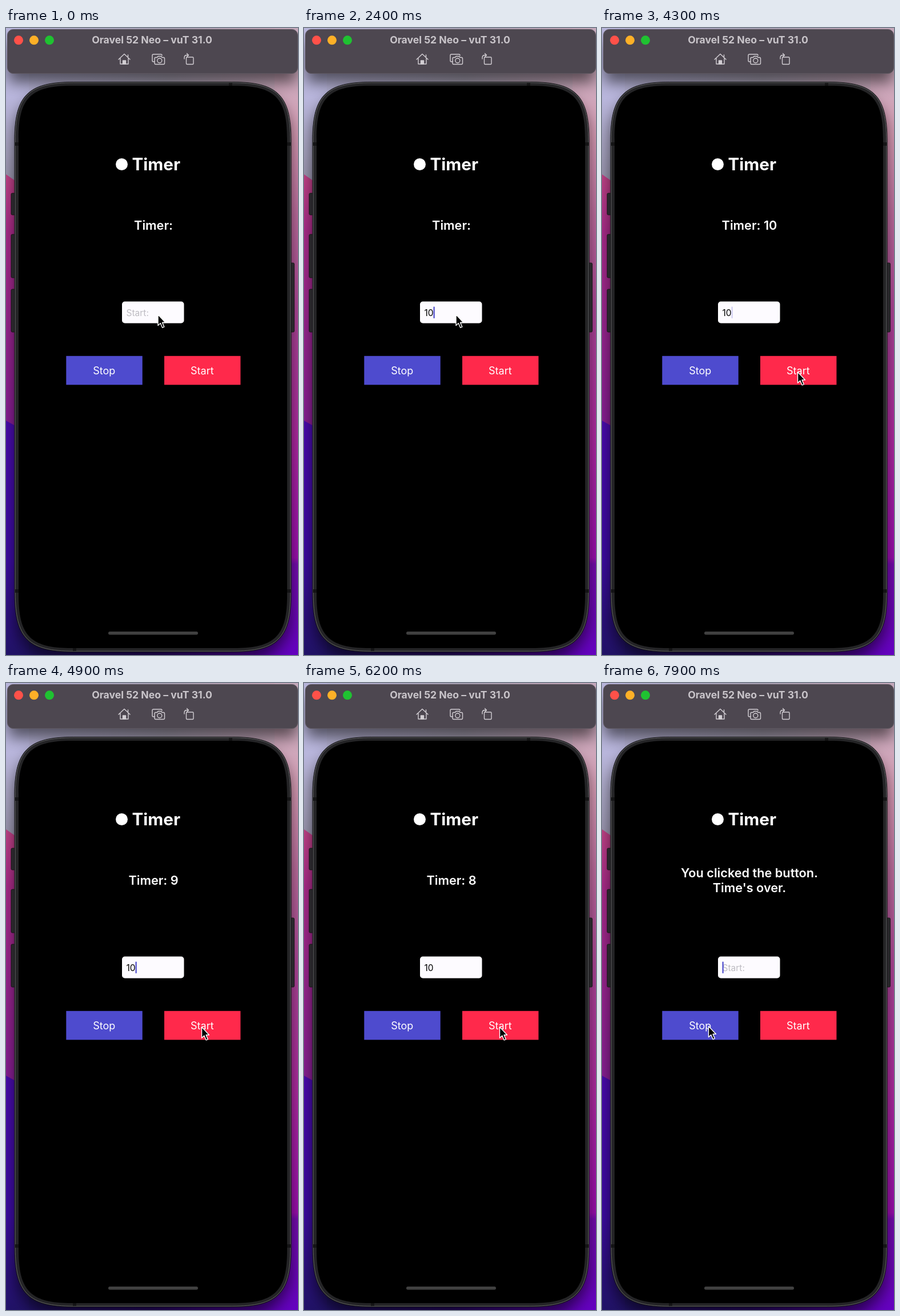
An HTML page for the animation above (8000 ms loop, 511 by 1097 pixels).

```html
<!DOCTYPE html>
<html lang="en">
<head>
<meta charset="utf-8">
<title>Timer</title>
<style>
  html, body { margin: 0; width: 100%; height: 100%; overflow: hidden; background: #17131f; }
  svg { display: block; width: 100vw; height: 100vh; }
  text { font-family: Inter, "Liberation Sans", sans-serif; fill: #fff; }
  .mid { text-anchor: middle; }
  .bar { font-size: 17.6px; font-weight: 700; fill: #c9c5ca; }
  .title { font-size: 29.6px; font-weight: 650; }
  .label { font-size: 21.7px; font-weight: 620; }
  .button { font-size: 18px; }
  .entry { font-size: 15.5px; }
  .icons { fill: none; stroke: #d2ced3; stroke-width: 1.4; stroke-linejoin: round; stroke-linecap: round; }
</style>
</head>
<body>
<svg viewBox="0 0 511 1097" preserveAspectRatio="none">
  <defs>
    <linearGradient id="sky" x2="0" y2="1">
      <stop offset="0" stop-color="#b9b6dc"/>
      <stop offset=".11" stop-color="#b9b6dc"/>
      <stop offset=".18" stop-color="#aaa6c4"/>
      <stop offset=".25" stop-color="#9793ab"/>
    </linearGradient>
    <linearGradient id="magenta" x2="0" y2="1">
      <stop offset="0" stop-color="#c24488"/>
      <stop offset=".2" stop-color="#aa2b8a"/>
      <stop offset="1" stop-color="#801c95"/>
    </linearGradient>
    <linearGradient id="indigo" x2="0" y2="1">
      <stop offset="0" stop-color="#4a0cae"/>
      <stop offset=".6" stop-color="#3c0ca2"/>
      <stop offset="1" stop-color="#211366"/>
    </linearGradient>
    <linearGradient id="rose" x2="0" y2="1">
      <stop offset="0" stop-color="#c6aabd"/>
      <stop offset=".11" stop-color="#cfa7bb"/>
      <stop offset=".17" stop-color="#d79bb4"/>
      <stop offset=".3" stop-color="#bf6d9f"/>
      <stop offset=".45" stop-color="#ae4798"/>
      <stop offset=".65" stop-color="#b02ba2"/>
      <stop offset=".845" stop-color="#9c0fb0"/>
      <stop offset=".855" stop-color="#760cb0"/>
      <stop offset="1" stop-color="#6402c0"/>
    </linearGradient>
    <linearGradient id="top">
      <stop offset="0" stop-color="#b9b6dc"/>
      <stop offset=".55" stop-color="#aaa3b5"/>
      <stop offset="1" stop-color="#cba8bb"/>
    </linearGradient>
    <linearGradient id="floor">
      <stop offset="0" stop-color="#211366"/>
      <stop offset=".5" stop-color="#2b0a70"/>
      <stop offset="1" stop-color="#6402c0"/>
    </linearGradient>
    <filter id="soft" x="-20%" y="-80%" width="140%" height="260%"><feGaussianBlur stdDeviation="13"/></filter>
  </defs>

  <rect width="511" height="1097" fill="url(#top)"/>
  <path d="M0 0H40V1097H0Z" fill="url(#sky)"/>
  <path d="M0 256L40 284V760H0Z" fill="url(#magenta)"/>
  <path d="M0 687L40 709V1097H0Z" fill="url(#indigo)"/>
  <path d="M470 0H511V1097H470Z" fill="url(#rose)"/>
  <path d="M40 1030H470V1097H40Z" fill="url(#floor)"/>
  <rect x="4" y="22" width="505" height="74" rx="10" opacity=".55" filter="url(#soft)"/>
  <rect x="15" y="112" width="484" height="996" rx="76" opacity=".55" filter="url(#soft)"/>

  <rect x="2.500" y="2.500" width="508" height="77" rx="10" fill="#4d4750" stroke="#5d5760"/>
  <circle cx="22" cy="21.300" r="8" fill="#ff5149"/>
  <circle cx="49" cy="21.300" r="8" fill="#fdb027"/>
  <circle cx="76" cy="21.300" r="8" fill="#1fc231"/>
  <text class="mid bar" x="255.500" y="27">Oravel 52 Neo – vuT 31.0</text>
  <g class="icons">
    <path d="M197 55L207 45.500L217 55M200 53V63H214V53M213.500 47V51"/>
    <path d="M204.500 63V57H209.500V63Z" fill="#d2ced3"/>
    <path d="M260 59H258Q256 59 256 57V48Q256 46 258 46H271Q273 46 273 48"/>
    <path d="M262 51.500H264.500L266 49.500H271.500L273 51.500H275.500Q277.500 51.500 277.500 53.500V61.500Q277.500 63.500 275.500 63.500H262Q260 63.500 260 61.500V53.500Q260 51.500 262 51.500Z"/>
    <circle cx="268.800" cy="57" r="4"/>
    <rect x="315.500" y="51" width="12.500" height="12.500" rx="1.500"/>
    <path d="M312 54V52Q312 47.500 316.500 47.500H319M316.500 44.500L319.500 47.500L316.500 50.500"/>
  </g>

  <g fill="#29272b" stroke="#111" stroke-width=".8">
    <rect x="9" y="289" width="8" height="38" rx="2"/>
    <rect x="9" y="361" width="8" height="76" rx="2"/>
    <rect x="9" y="457" width="8" height="75" rx="2"/>
    <rect x="497" y="411" width="7.500" height="121" rx="2"/>
  </g>
  <path id="frame" fill="#242426" stroke="#111113"/>
  <path id="rim" fill="none" stroke="#606063"/>
  <path d="M16 200H22V206H16ZM492 200H498V206H492ZM16 982H22V988H16ZM492 982H498V988H492ZM390 96H396V101H390ZM117 1085H123V1090H117Z" fill="#141415"/>
  <path id="screen"/>
  <rect x="179" y="1056" width="157" height="5.500" rx="2.700" fill="#404040"/>

  <circle cx="202.500" cy="238.500" r="10.500" fill="#fff"/>
  <text class="title" x="220.500" y="249">Timer</text>
  <text id="line1" class="mid label" x="258"></text>
  <text id="line2" class="mid label" x="258" y="366"></text>

  <rect x="203" y="478.500" width="108.500" height="38" rx="5" fill="#fdfbff"/>
  <text id="entry" class="entry" x="210.500" y="503.500"></text>
  <rect id="caret" y="487.500" width="2.200" height="20.500" rx="1" fill="#4d4bcd"/>

  <rect x="105.300" y="573.800" width="133.400" height="50.500" fill="#4e4bce"/>
  <rect x="277" y="573.800" width="133.400" height="50.500" fill="#ff294b"/>
  <text class="mid button" x="171.800" y="606">Stop</text>
  <text class="mid button" x="343.300" y="606">Start</text>

  <path id="pointer" d="M0 1V20L4.300 16L7.600 23.800L10.800 22.400L7.500 14.800H13Z"
    fill="#000" stroke="#fff" stroke-width="1.400" stroke-linejoin="round"/>
</svg>
<script>
const LOOP = 8000;
const TYPE_1 = 2000, TYPE_0 = 2200, START = 3450, STOP = 7700;
const FIELD = [266, 500.5], START_BTN = [342.5, 601], STOP_BTN = [186.5, 599.5];
const byId = id => document.getElementById(id);
const [line1, line2, entry, caret, pointer] =
  ["line1", "line2", "entry", "caret", "pointer"].map(byId);

// Rectangle whose corners ease smoothly into the sides.
function smoothRect(x, y, w, h, r) {
  const reach = 1.4 * r, pull = 0.314 * r, keep = reach - pull;
  const H = w - 2 * reach, V = h - 2 * reach;
  return `M${x + reach} ${y}h${H}c${keep} 0 ${reach} ${pull} ${reach} ${reach}` +
    `v${V}c0 ${keep} ${-pull} ${reach} ${-reach} ${reach}` +
    `h${-H}c${-keep} 0 ${-reach} ${-pull} ${-reach} ${-reach}` +
    `v${-V}c0 ${-keep} ${pull} ${-reach} ${reach} ${-reach}z`;
}
byId("frame").setAttribute("d", smoothRect(15, 94.5, 484, 997, 74));
byId("rim").setAttribute("d", smoothRect(16.2, 95.7, 481.6, 994.6, 73));
byId("screen").setAttribute("d", smoothRect(22, 101, 470, 984, 67));

const ramp = (t, a, b) => Math.min(1, Math.max(0, (t - a) / (b - a)));
const ease = u => u * u * (3 - 2 * u);

function setText(node, text) {
  if (node.textContent !== text) node.textContent = text;
}

function pointerAt(t) {
  const a = ease(ramp(t, 2550, 3250));
  const b = ease(ramp(t, 7000, 7600));
  return [0, 1].map(i =>
    FIELD[i] + (START_BTN[i] - FIELD[i]) * a + (STOP_BTN[i] - START_BTN[i]) * b);
}

function caretAlpha(t) {
  const p = t % 1000;
  if (t < TYPE_1) {
    return t < 500 ? 0 : Math.max(ramp(p, 500, 600), t > 1000 ? 1 - ramp(p, 0, 150) : 0);
  }
  if (t < TYPE_0 + 500 || t >= STOP) return 1;
  return Math.max(ramp(p, 250, 450), 1 - ramp(p, 0, 150));
}

function draw(t) {
  const stopped = t >= STOP;
  const typed = stopped || t < TYPE_1 ? "" : t < TYPE_0 ? "1" : "10";
  const count = t < START ? "" : " " + (10 - Math.floor((t - START) / 1000));

  setText(line1, stopped ? "You clicked the button." : "Timer:" + count);
  setText(line2, stopped ? "Time's over." : "");
  line1.setAttribute("y", stopped ? 340 : 353);

  setText(entry, typed || "Start:");
  entry.style.fill = typed ? "#000" : "#bebcc2";
  caret.setAttribute("x", [210.5, 218, 226.5][typed.length]);
  caret.setAttribute("opacity", caretAlpha(t));

  pointer.setAttribute("transform", `translate(${pointerAt(t)})`);
}

const begin = performance.now();
function tick() {
  draw((performance.now() - begin) % LOOP);
  requestAnimationFrame(tick);
}
tick();
</script>
</body>
</html>
```
